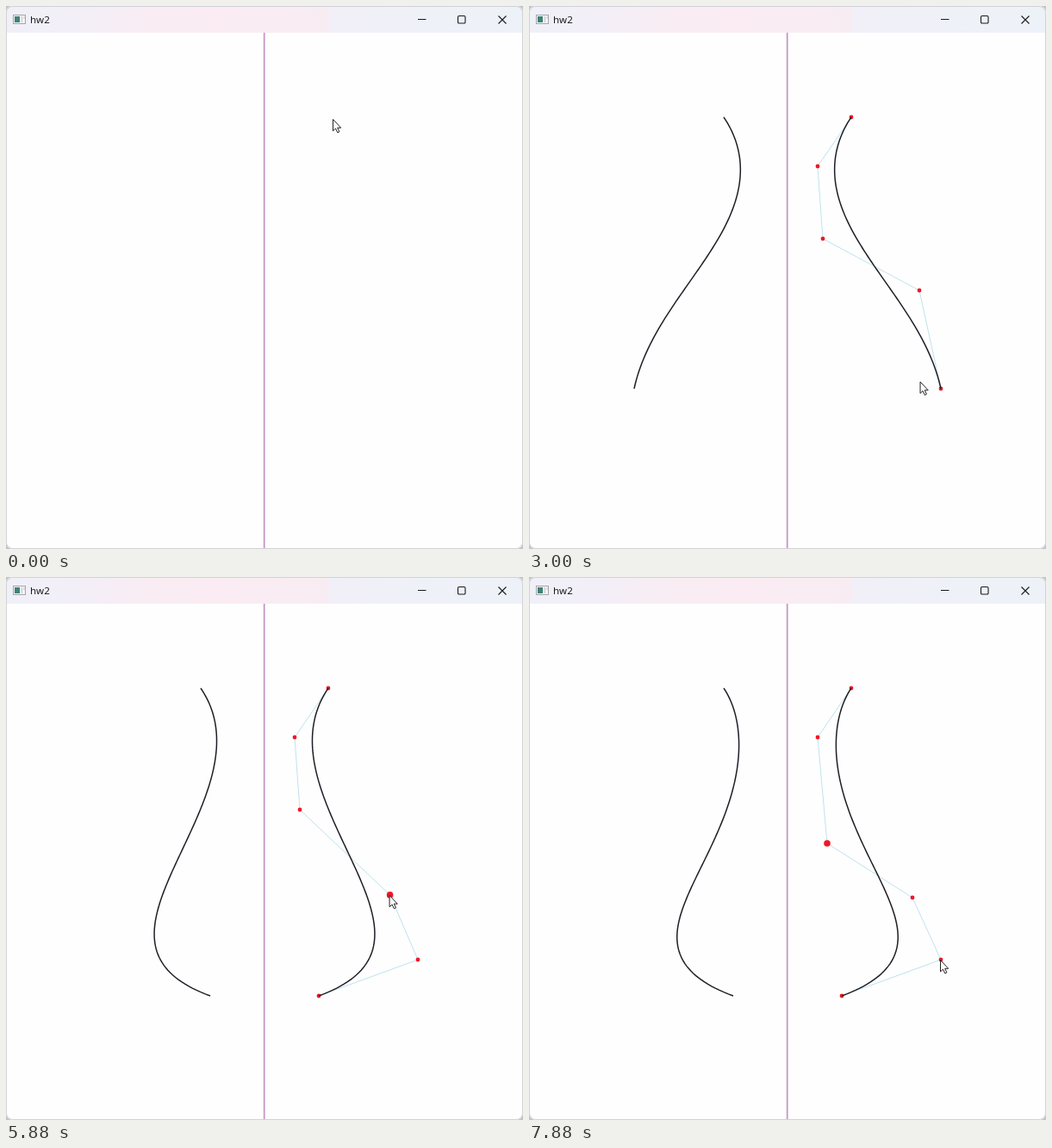
An HTML page for the animation above (8000 ms loop, 600 px wide and 630 px high).

```html
<!DOCTYPE html>
<html lang="en">
<head>
<meta charset="utf-8">
<title>hw2</title>
<style>
  html, body { margin: 0; width: 100%; height: 100%; overflow: hidden; background: #c4c4c8; }
  svg { display: block; width: 600px; height: 630px; }
  text { font: 11.6px "Open Sans", "Noto Sans", sans-serif; fill: #101010; }
  .buttons { fill: none; stroke: #1a1a1a; stroke-width: 1.1; }
  #hull { fill: none; stroke: #c0e2ed; stroke-width: 1; }
  .curve { fill: none; stroke: #1e1e26; stroke-width: 1.5; }
  #dots { fill: #ee1828; }
  #cursor { fill: #fff; stroke: #222; stroke-width: 1; stroke-linejoin: round; }
</style>
</head>
<body>
<svg viewBox="0 0 600 630">
  <defs>
    <linearGradient id="bar">
      <stop offset="0" stop-color="#f0f0f8"/>
      <stop offset=".12" stop-color="#f2eff8"/>
      <stop offset=".28" stop-color="#f9ecf3"/>
      <stop offset=".4" stop-color="#faecf2"/>
      <stop offset=".622" stop-color="#f8ecf3"/>
      <stop offset=".627" stop-color="#f1eff8"/>
      <stop offset=".8" stop-color="#eff1f8"/>
      <stop offset="1" stop-color="#edf2f8"/>
    </linearGradient>
    <clipPath id="window"><rect width="600" height="630" rx="8"/></clipPath>
  </defs>
  <g clip-path="url(#window)">
    <rect width="600" height="630" fill="#fefefe"/>
    <rect width="600" height="31" fill="url(#bar)"/>
    <path d="M299.7 31V630" stroke="#c598c4" stroke-width="1.8"/>
  </g>
  <rect x=".5" y=".5" width="599" height="629" rx="7.5" fill="none" stroke="#d2d2d6"/>

  <rect x="8.5" y="10.5" width="14" height="10" fill="#f4f4f6" stroke="#a2a6aa"/>
  <rect x="10" y="12" width="6" height="7" fill="#3f8378"/>
  <path d="M18.5 12V19M21 12V15" stroke="#c3c7cb"/>
  <text x="28" y="20">hw2</text>
  <g class="buttons">
    <path d="M478 15.5H487.5M571.5 11.5L580.5 20.5M580.5 11.5L571.5 20.5"/>
    <rect x="524.5" y="11.5" width="8.5" height="8.5" rx="1.3"/>
  </g>

  <polyline id="hull"/>
  <g id="dots"></g>
  <polyline id="curve" class="curve"/>
  <polyline id="mirror" class="curve" transform="matrix(-1 0 0 1 600 0)"/>
  <path id="cursor" d="M0 0V13.4L3 10.6L5.3 15.4L7.4 14.4L5.2 9.8H9.2Z"/>
</svg>
<script>
const STEP = 125, STEPS = 64;
const $ = id => document.getElementById(id);

const knots = [[374, 129], [335, 186], [341, 270], [453, 330], [478, 444], [363, 486]];
const legs = [];

// Adds an eased pointer move of `travel` steps that then rests for `pause` steps.
// A move may bow sideways, carry a knot along, or place one when it leaves.
function move(to, travel, pause, { bow = 0, carry, place } = {}) {
  const last = legs[legs.length - 1] || { to: [380, 131], leave: 0 };
  const arrive = last.leave + travel;
  legs.push({ from: last.to, to, start: last.leave, arrive, leave: arrive + pause, bow, carry, place });
}
const placeKnot = (i, travel, pause, bow) => move(knots[i], travel, pause, { place: i, bow });
function dragKnot(i, to) {
  move(knots[i], 3, 1);
  move(to, 6, 1, { carry: i });
}

placeKnot(0, 1, 1);
placeKnot(1, 3, 1);
placeKnot(2, 4, 1);
placeKnot(3, 4, 1);
placeKnot(4, 4, 3, 7);
placeKnot(5, 4, 3, -34);
move([505, 288], 5, 3);
dragKnot(3, [445, 372]);
dragKnot(2, [346, 309]);
move(knots[4], 3, 1);

const smooth = f => f * f * (3 - 2 * f);
const mix = (a, b, f) => a.map((v, i) => v + (b[i] - v) * f);

function along({ from, to, start, arrive, bow }, step) {
  const f = smooth(Math.min(1, (step - start) / (arrive - start)));
  const [x, y] = mix(from, to, f);
  const dx = to[0] - from[0], dy = to[1] - from[1];
  const side = bow * Math.sin(Math.PI * f) / Math.hypot(dx, dy);
  return [x + dy * side, y - dx * side];
}

function knotsAt(step) {
  const points = [];
  for (const leg of legs) {
    if (leg.place !== undefined && step > leg.leave) points[leg.place] = leg.to;
    if (leg.carry !== undefined && step > leg.start) points[leg.carry] = along(leg, step);
  }
  return points;
}

function casteljau(points, t) {
  while (points.length > 1) points = points.slice(1).map((p, i) => mix(points[i], p, t));
  return points[0];
}

function draw(step) {
  const points = knotsAt(step);
  const selected = legs.filter(leg => leg.carry !== undefined && step >= leg.start).pop();
  const line = points.length > 1
    ? Array.from({ length: 101 }, (_, i) => casteljau(points, i / 100)).join(' ') : '';

  $('hull').setAttribute('points', points.join(' '));
  $('curve').setAttribute('points', line);
  $('mirror').setAttribute('points', line);
  $('dots').innerHTML = points.map(([x, y], i) =>
    `<circle cx="${x}" cy="${y}" r="${selected && selected.carry === i ? 3.8 : 2.4}"/>`).join('');

  const [x, y] = along(legs.find(leg => step <= leg.leave), step);
  $('cursor').setAttribute('transform', `translate(${x - 0.5} ${y + 0.5})`);
}

let shown = -1;
function tick() {
  const step = Math.floor(performance.now() / STEP) % STEPS;
  if (step !== shown) draw(shown = step);
  requestAnimationFrame(tick);
}
tick();
</script>
</body>
</html>
```
